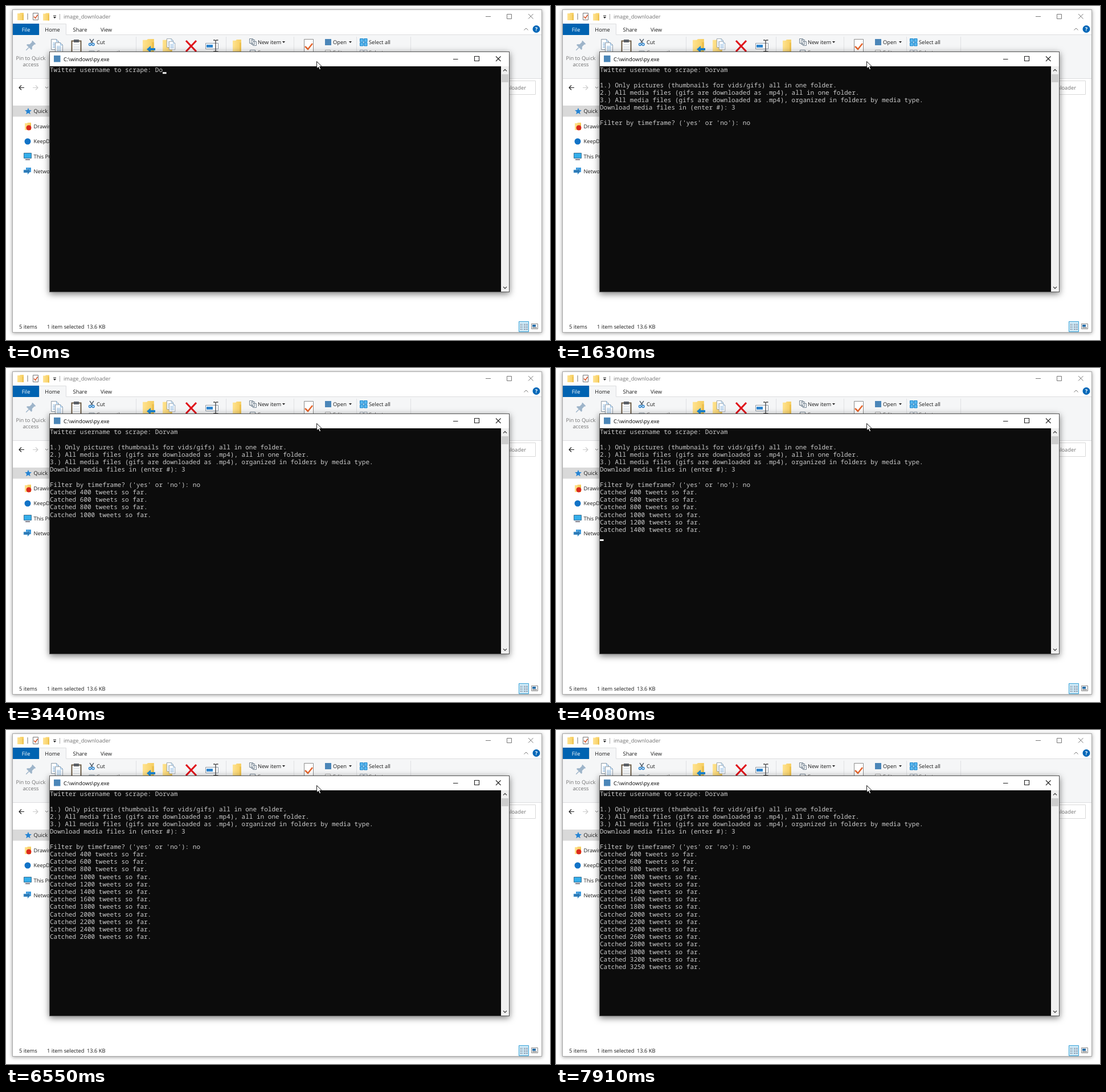
An HTML page that plays this animation: 955 px wide and 587 px high, repeating every 8000 ms.

```html
<!DOCTYPE html>
<html lang="en">
<head>
<meta charset="utf-8">
<title>Media downloader</title>
<style>
html, body { margin: 0; width: 100%; height: 100%; overflow: hidden; background: #fefefe; }
svg { display: block; width: 955px; height: 587px; }
text { font: 9.3px "Open Sans", "Noto Sans", sans-serif; fill: #1a1a1a; text-rendering: geometricPrecision; white-space: pre; }
#rows text { font: 11px "Noto Sans Mono", "DejaVu Sans Mono", monospace; fill: #ccc; }
.mid { text-anchor: middle; }
.gray { fill: #737373; }
.line { fill: none; stroke: #222; }
.soft { fill: none; stroke: #777; }
.frame { filter: drop-shadow(0 1px 3px #0006); }
.console { filter: drop-shadow(0 3px 6px #0008); }
</style>
</head>
<body>
<svg viewBox="0 0 955 587">
  <defs>
    <linearGradient id="gold" x2="1"><stop stop-color="#ffe391"/><stop offset="1" stop-color="#f6cd5e"/></linearGradient>
    <g id="folder"><path d="M0 1h4l1-1h6v13H0z" fill="url(#gold)"/><path d="M9 3h2v10H9z" fill="#ecc04d"/></g>
    <g id="sheet"><path d="M.5.5h9l4 4v14H.5z" fill="#fff" stroke="#8b98a5"/><path d="M9.500.5v4h4M3 7h8M3 9.500h8M3 12h8M3 14.500h8" fill="none" stroke="#7eb0dd"/></g>
    <path id="drop" d="M0 0h5l-2.500 3z" fill="#222"/>
  </defs>

  <rect class="frame" x="11.500" y="6.500" width="929" height="567" fill="#fff" stroke="#a9a9a9"/>

  <g id="titlebar">
    <use href="#folder" x="20" y="12"/>
    <path d="M38 13v11" class="soft"/>
    <path d="M47.500 12.500h9v12h-9z" fill="#fff" stroke="#777"/>
    <path d="M49 18.500l2.500 3 4-6" fill="none" stroke="#d9562b" stroke-width="1.500"/>
    <use href="#folder" x="65" y="12.500"/>
    <path d="M83 17h5" class="line"/><use href="#drop" x="83" y="19"/>
    <path d="M94.500 14v10" stroke="#aaa"/>
    <text x="101" y="22" class="gray">image_downloader</text>
    <path d="M842 18.500h9M879.500 14.500h8v8h-8zM917 14l8.500 8.500M925.500 14L917 22.500" class="soft"/>
  </g>

  <g id="ribbon">
    <path d="M12 51h928v76H12z" fill="#f5f6f7"/>
    <path d="M12 50.500h46.500v-19h47v19H940M12 127.500h928" fill="none" stroke="#dcdddf"/>
    <path d="M59 32h46v20H59z" fill="#f5f6f7"/>
    <path d="M12 31h46v20H12z" fill="#0063b1"/>
    <text class="mid" x="35" y="44.500" style="fill:#fff">File</text>
    <text class="mid" x="81.500" y="44.500">Home</text>
    <text class="mid" x="130" y="44.500">Share</text>
    <text class="mid" x="176" y="44.500">View</text>
    <path d="M909.500 42.500l3.500-3.500 3.500 3.500" class="soft"/>
    <circle cx="931" cy="40.500" r="6.500" fill="#0067b8"/>
    <text class="mid" x="931" y="44" style="fill:#fff;font-weight:700">?</text>
    <path d="M228.500 54v70M386.500 54v70M505.500 54v70M615.500 54v70M710.500 54v70" stroke="#e0e1e3"/>

    <g transform="translate(43 70) rotate(45)" fill="#9db4c9">
      <path d="M-4-9h8v2h-1v6l3 3v2h-12V2l3-3v-6h-1z"/><path d="M-.7 4h1.400v7h-1.400z"/>
    </g>
    <text class="mid gray" x="43.500" y="95">Pin to Quick</text>
    <text class="mid gray" x="43.500" y="105.500">access</text>
    <use href="#sheet" x="79" y="58"/><use href="#sheet" x="86" y="64"/>
    <path d="M115.500 61.500h16v22h-16z" fill="#fff" stroke="#6a5a45" stroke-width="2"/>
    <path d="M119 59h9v5h-9z" fill="#5a5f66"/><path d="M118 68h11M118 72h11M118 76h11" stroke="#c3ced8"/>
    <path d="M147 58l5 7M154 58l-5 7" fill="none" stroke="#4c5a68" stroke-width="1.300"/>
    <circle cx="147.500" cy="67.500" r="2" fill="none" stroke="#1979ca" stroke-width="1.300"/>
    <circle cx="153" cy="67.500" r="2" fill="none" stroke="#1979ca" stroke-width="1.300"/>
    <path d="M146 79h9v5h-9z" fill="#fff" stroke="#8b98a5"/>
    <text x="159" y="67">Cut</text><text x="159" y="85" class="gray">Copy path</text>

    <use href="#folder" transform="translate(240 58) scale(1.800 1.850)"/>
    <path d="M247 76l7-6v4h8v4h-8v4z" fill="#1e88d2"/>
    <use href="#folder" transform="translate(275 58) scale(1.500 1.850)"/>
    <use href="#sheet" transform="translate(282 57) scale(.85)"/><use href="#sheet" transform="translate(286 62) scale(.8)"/>
    <path d="M316 61l18 19M334 61l-18 19" stroke="#e0121b" stroke-width="3.200"/>
    <path d="M350.500 65.500h22v10h-22z" fill="#fff" stroke="#8c98a4"/><path d="M352 68h11v5h-11z" fill="#2f86cf"/>
    <path d="M364 60h2.500l1.500 1 1.500-1h3M368 61v18M364 80h2.500l1.500-1 1.500 1h3" fill="none" stroke="#444" stroke-width="1.300"/>
    <use href="#folder" transform="translate(398 59) scale(1.350 1.800)"/>
    <path d="M427.500 57.500h6v8h-6zM430.500 59.500h6v8h-6zM433.500 62.500h6v7h-6z" fill="#fff" stroke="#70808f"/>
    <text x="442" y="67">New item</text><use href="#drop" x="485" y="62"/>
    <path d="M428.500 77.500h9v8h-9z" fill="#fff" stroke="#70808f"/>
    <text x="442" y="85" class="gray">Easy access</text><use href="#drop" x="492" y="80"/>
    <path d="M523.500 58.500h16v24h-16z" fill="#fff" stroke="#8e8e8e"/>
    <path d="M525 71l5 5 8-10" fill="none" stroke="#e5642b" stroke-width="2.500"/>
    <path d="M560 58h11v11h-11z" fill="#4b86b8"/>
    <text x="574" y="67">Open</text><use href="#drop" x="602" y="62"/>
    <path d="M560.500 77.500h9v8h-9z" fill="#fff" stroke="#aaa"/><text x="574" y="85" class="gray">Edit</text>
    <path d="M621.500 57.500h5.500v5.500h-5.500zM628.500 57.500h5.500v5.500h-5.500zM621.500 64.500h5.500v5.500h-5.500zM628.500 64.500h5.500v5.500h-5.500z" fill="#5bb8ee" stroke="#1583cc"/>
    <path d="M621.500 77.500h5.500v5.500h-5.500zM628.500 77.500h5.500v5.500h-5.500z" fill="#fff" stroke="#9aa5b0"/>
    <text x="637" y="67">Select all</text><text x="637" y="85" class="gray">Select none</text>
  </g>

  <g id="address">
    <path d="M32 143.500h-9M27 139.500l-4 4 4 4" class="line" stroke-width="1.200"/>
    <path d="M47 143.500h9M52 139.500l4 4-4 4" fill="none" stroke="#ccc" stroke-width="1.200"/>
    <path d="M69 142l2.500 2.500L74 142" class="soft"/>
    <path d="M700.500 131.500h229v24h-229z" fill="#fff" stroke="#d9d9d9"/>
    <text x="913" y="147" class="gray" text-anchor="end">Search image_downloader</text>
  </g>

  <g id="sidebar">
    <path d="M12 175h66v19.500H12z" fill="#d9d9d9"/>
    <path d="M39 179l1.700 4 4.300.3-3.300 2.800 1 4.200-3.700-2.300-3.700 2.300 1-4.200-3.300-2.800 4.300-.3z" fill="#2584d3"/>
    <text x="48.500" y="188">Quick access</text>
    <use href="#folder" x="33" y="205"/><circle cx="40" cy="214" r="4.500" fill="#da2a1c"/>
    <text x="48.500" y="214.500">Drawing files</text>
    <circle cx="38" cy="238" r="5.500" fill="#1173c7"/>
    <text x="48.500" y="241">KeepDen</text>
    <path d="M31.500 258.500h13v9h-13z" fill="#35aeea" stroke="#3b6f93"/><path d="M34 270h8" stroke="#556" stroke-width="1.500"/>
    <text x="48.500" y="267.500">This PC</text>
    <path d="M35 284h9v8h-9z" fill="#3b9ade"/><path d="M31 288h7v-3l5 5.500-5 5.500v-3h-7z" fill="#2b78b5" stroke="#8ac7ee" stroke-width=".6"/>
    <text x="48.500" y="294">Network</text>
  </g>

  <g id="status">
    <text x="23" y="567">5 items</text>
    <text x="72" y="567">1 item selected</text>
    <text x="142" y="567">13.6 KB</text>
    <path d="M900.500 554.500h17v18h-17z" fill="#cce8f6" stroke="#3aa3d8"/>
    <path d="M903 559.500h4M903 562.500h4M903 565.500h4M903 568.500h4" stroke="#667" stroke-dasharray="2 1"/>
    <path d="M909 559.500h7M909 562.500h7M909 565.500h7M909 568.500h7" stroke="#778" stroke-dasharray="3 1"/>
    <path d="M922.500 558.500h11v9h-11z" fill="#fff" stroke="#888"/><path d="M924 560h6v4h-6z" fill="#2a6fa8"/><path d="M924 565.500h8" stroke="#555"/>
  </g>

  <g id="console">
    <rect class="console" x="76.500" y="80.500" width="807" height="422" fill="#fff" stroke="#555"/>
    <path d="M84 87h11.500v11.500H84z" fill="#4b86b8"/>
    <text x="101" y="96.500" style="fill:#000">C:\windows\py.exe</text>
    <path d="M785 93.500h8.500M822.500 88.500h8v8h-8zM860 88.500l8.500 8.500M868.500 88.500L860 97" class="line" stroke-width="1.100"/>
    <path d="M77 106h792v396H77z" fill="#0c0c0c"/>
    <path d="M869 106h14v396h-14z" fill="#f0f0f0"/>
    <path d="M870 120h12v14h-12z" fill="#cdcdcd"/>
    <path d="M873 114.500l3-3 3 3M873 493.500l3 3 3-3" fill="none" stroke="#505050" stroke-width="1.400"/>
    <g id="rows"></g>
    <rect id="caret" width="6.600" height="3" fill="#f2f2f2"/>
  </g>

  <path d="M545.500 97.500v12.500l2.900-2.700 2 4.500 2.200-1-2-4.400h4z" fill="#fff" stroke="#000" stroke-width=".9"/>
</svg>

<script>
const LOOP = 8000, LEFT = 77, TOP = 106, CELL = 6.6, ROW = 13.2;
const ask = 'Twitter username to scrape: ';
const pick = 'Download media files in (enter #): ';
const filter = "Filter by timeframe? ('yes' or 'no'): ";

// [time, row, text]
const prints = [
  [0, 0, ask + 'Do'], [40, 0, ask + 'Dorv'], [90, 0, ask + 'Dorva'], [140, 0, ask + 'Dorvam'],
  [180, 2, '1.) Only pictures (thumbnails for vids/gifs) all in one folder.'],
  [180, 3, '2.) All media files (gifs are downloaded as .mp4), all in one folder.'],
  [180, 4, '3.) All media files (gifs are downloaded as .mp4), organized in folders by media type.'],
  [180, 5, pick], [620, 5, pick + '3'],
  [960, 7, filter], [1450, 7, filter + 'n'], [1500, 7, filter + 'no']
];
const catches = [2170, 2700, 3000, 3440, 3710, 4080, 4520, 4870, 5120, 5420, 5810, 6550, 6840, 7170, 7670, 7910];
catches.forEach((time, i) =>
  prints.push([time, 8 + i, `Catched ${Math.min(400 + 200 * i, 3250)} tweets so far.`]));

// [time, column, row], hidden when no cell is given
const carets = [
  [0, 30, 0], [40, 32, 0], [90, 33, 0], [140, 34, 0], [180, 35, 5], [620, 36, 5], [800],
  [1100, 38, 7], [1400], [1500, 40, 7], [1630], [1770, 0, 8], [1870],
  [2360, 0, 9], [2650], [3730, 0, 13], [4080, 0, 14], [4470],
  [5860, 0, 19], [6500], [6890, 0, 21], [7170, 0, 22], [7620]
];

const caret = document.getElementById('caret');
const rows = Array.from({ length: 24 }, (_, i) => {
  const row = document.createElementNS('http://www.w3.org/2000/svg', 'text');
  row.setAttribute('x', LEFT);
  row.setAttribute('y', TOP + 10.4 + ROW * i);
  return document.getElementById('rows').appendChild(row);
});

function render(time) {
  const lines = rows.map(() => '');
  for (const [at, row, text] of prints) if (at <= time) lines[row] = text;
  lines.forEach((text, i) => { if (rows[i].textContent !== text) rows[i].textContent = text; });

  const [, col, row] = carets.findLast(([at]) => at <= time);
  caret.style.display = row === undefined ? 'none' : '';
  if (row !== undefined) {
    caret.setAttribute('x', LEFT + CELL * col);
    caret.setAttribute('y', TOP + ROW * (row + 1) - 3);
  }
}

function tick() {
  render(performance.now() % LOOP);
  requestAnimationFrame(tick);
}
tick();
</script>
</body>
</html>
```
